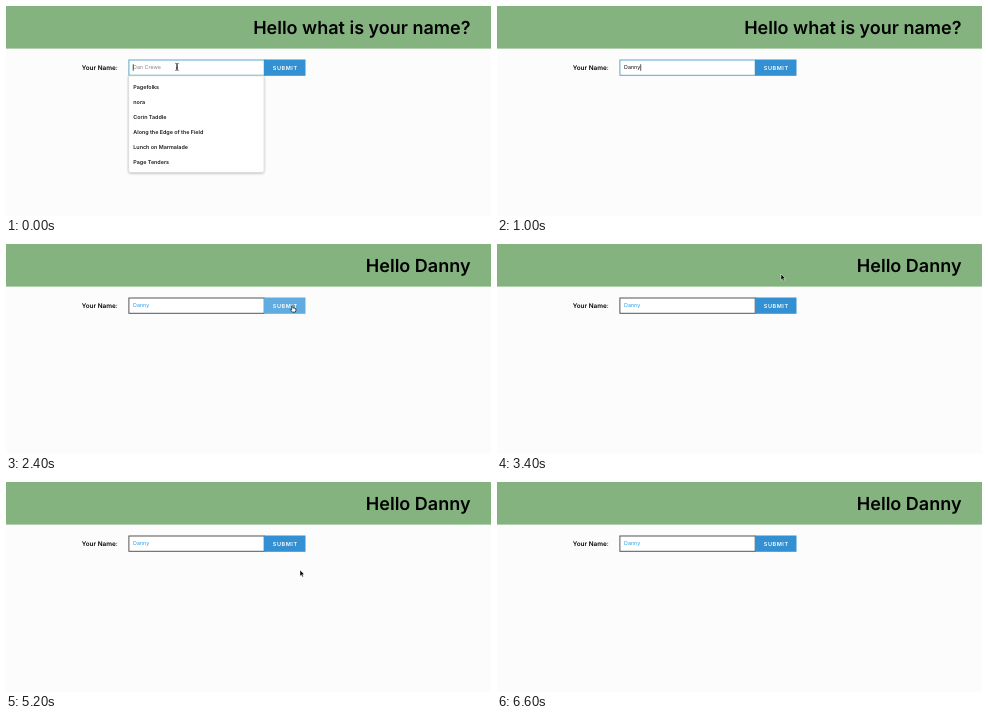
Write an HTML page that moves like this. It is 485 px wide and 210 px high and loops after 8500 ms.

```html
<!DOCTYPE html>
<html lang="en">
<head>
<meta charset="utf-8">
<title>Name form</title>
<style>
  html, body { margin: 0; width: 485px; height: 210px; overflow: hidden; background: #fcfcfc; }
  svg { display: block; }
  text { font-family: Inter, "Liberation Sans", sans-serif; text-rendering: geometricPrecision; white-space: pre; }
  #title { font-size: 18px; font-weight: 600; text-anchor: end; }
  #label { font-size: 6.4px; font-weight: 600; }
  #value { font-size: 5.4px; }
  #submit { font-size: 5.5px; font-weight: 600; letter-spacing: .55px; fill: #fff; }
  #list text { font-size: 5.4px; font-weight: 600; fill: #1c1c1c; }
</style>
</head>
<body>
<svg width="485" height="210" viewBox="0 0 485 210">
  <defs>
    <filter id="shadow" x="-10%" y="-10%" width="120%" height="120%">
      <feDropShadow dx="0" dy=".6" stdDeviation=".8" flood-color="#000" flood-opacity=".3"/>
    </filter>
  </defs>
  <rect width="485" height="210" fill="#fcfcfc"/>
  <rect width="485" height="42.6" fill="#84b380"/>
  <text id="title" x="464.5" y="28.3"></text>
  <text id="label" x="75.8" y="64.2">Your Name:</text>
  <rect id="field" x="122.9" y="54" width="135.3" height="15.3" fill="#fff" stroke-width="1"/>
  <text id="value" x="127" y="63.4"></text>
  <rect id="caret" y="58.2" width=".7" height="6.6" fill="#111"/>
  <rect id="button" x="258" y="53.5" width="41.5" height="16.3"/>
  <text id="submit" x="266.8" y="63.5">SUBMIT</text>
  <g id="list">
    <path d="M122.6 69.8H258V164.5q0 2-2 2H124.6q-2 0-2-2Z" fill="#fff" stroke="#c9c9c9" stroke-width=".5" filter="url(#shadow)"/>
  </g>
  <g id="pointer">
    <path id="ibeam" d="M-1.6-3.6Q0-3.6 0-2.6V2.4Q0 3.4-1.6 3.4M1.6-3.6Q0-3.6 0-2.6V2.4Q0 3.4 1.6 3.4M-.8.8H.8" fill="none" stroke="#222" stroke-width=".8"/>
    <path id="arrow" d="M0 0V6.2L1.4 4.9 2.3 7 3.4 6.5 2.5 4.5H4.4Z" fill="#000" stroke="#fff" stroke-width=".5"/>
    <path id="hand" d="M-.9-2.8q.7-.7 1.1.1L.6-1q2 .1 2.7.7.5 1.6-.5 3.4H-.2L-2.1.8q0-.9 1.4-.2Z" fill="#fff" stroke="#111" stroke-width=".7"/>
  </g>
</svg>
<script>
const LOOP = 8500;
const NAME = "Danny";
const CLUBS = ["Pagefolks", "nora", "Corin Taddle", "Along the Edge of the Field", "Lunch on Marmalade", "Page Tenders"];
const el = id => document.getElementById(id);

CLUBS.forEach((club, i) => {
  const row = document.createElementNS("http://www.w3.org/2000/svg", "text");
  row.setAttribute("x", 127.3);
  row.setAttribute("y", 82.5 + 15 * i);
  row.textContent = club;
  el("list").append(row);
});

// [time, shape, x, y], each held until the next
const POINTER = [
  [0, "ibeam", 171, 61], [100, "arrow", 204, 82], [200, "arrow", 250, 116], [300, "arrow", 275, 130],
  [800, "arrow", 350, 75], [900, "arrow", 416, 21], [1000, ""],
  [1400, "arrow", 310, 56], [1500, "arrow", 305, 62], [1600, "hand", 298, 67], [1700, "hand", 294, 69],
  [1800, "hand", 292, 69.2], [1900, "hand", 291.3, 69], [2100, "hand", 290.5, 68.5], [2200, "hand", 289, 67],
  [2300, "hand", 286.5, 65],
  [3200, "hand", 285, 59], [3300, "arrow", 284, 45], [3400, "arrow", 284, 30], [3500, "arrow", 284, 18],
  [3700, "arrow", 282, 8], [3800, "arrow", 276, 0], [3900, "arrow", 269, 14], [4000, "arrow", 274, 36],
  [4100, "arrow", 290, 40], [4200, "arrow", 298.7, 31],
  [5100, "arrow", 298, 50], [5200, "arrow", 294, 88], [5300, "arrow", 291.5, 112],
  [5500, "arrow", 291.5, 137], [5600, ""],
  [6000, "arrow", 340.2, 121], [6100, "arrow", 341, 126.5], [6200, "arrow", 342, 110], [6300, "arrow", 339.5, 94],
  [6500, "arrow", 330, 80.5], [6600, ""]
];
const TYPED = [[0, 0], [500, 1], [800, 2], [900, 4], [1000, 5]];
const CARET = [[0, true], [200, false], [500, true], [1400, false]];
const LIST = [[0, 1], [500, .45], [600, 0]];
const BUTTON = [[0, "#3290d3"], [1600, "#3a95d4"], [2300, "#60abdf"], [3300, "#3290d3"]];

const at = (table, t) => table.findLast(step => step[0] <= t);

function draw(t) {
  const sent = t >= 2300;
  const count = at(TYPED, t)[1];
  const value = el("value");

  el("title").textContent = sent ? "Hello " + NAME : "Hello what is your name?";
  value.textContent = count ? NAME.slice(0, count) : "Dan Crewe";
  value.setAttribute("fill", sent ? "#2f9fe8" : count ? "#111" : "#858585");
  el("field").setAttribute("stroke", sent ? "#555" : "#5ba9c9");
  el("button").setAttribute("fill", at(BUTTON, t)[1]);
  el("list").setAttribute("opacity", at(LIST, t)[1]);

  const end = count ? 127.2 + value.getComputedTextLength() : 126.8;
  el("caret").setAttribute("x", end);
  el("caret").setAttribute("opacity", at(CARET, t)[1] ? 1 : 0);

  const [, shape, x = 0, y = 0] = at(POINTER, t);
  el("pointer").setAttribute("transform", `translate(${x} ${y})`);
  for (const id of ["ibeam", "arrow", "hand"])
    el(id).setAttribute("visibility", id === shape ? "visible" : "hidden");
}

const start = performance.now();
function tick() {
  draw((performance.now() - start) % LOOP);
  requestAnimationFrame(tick);
}
tick();
</script>
</body>
</html>
```
